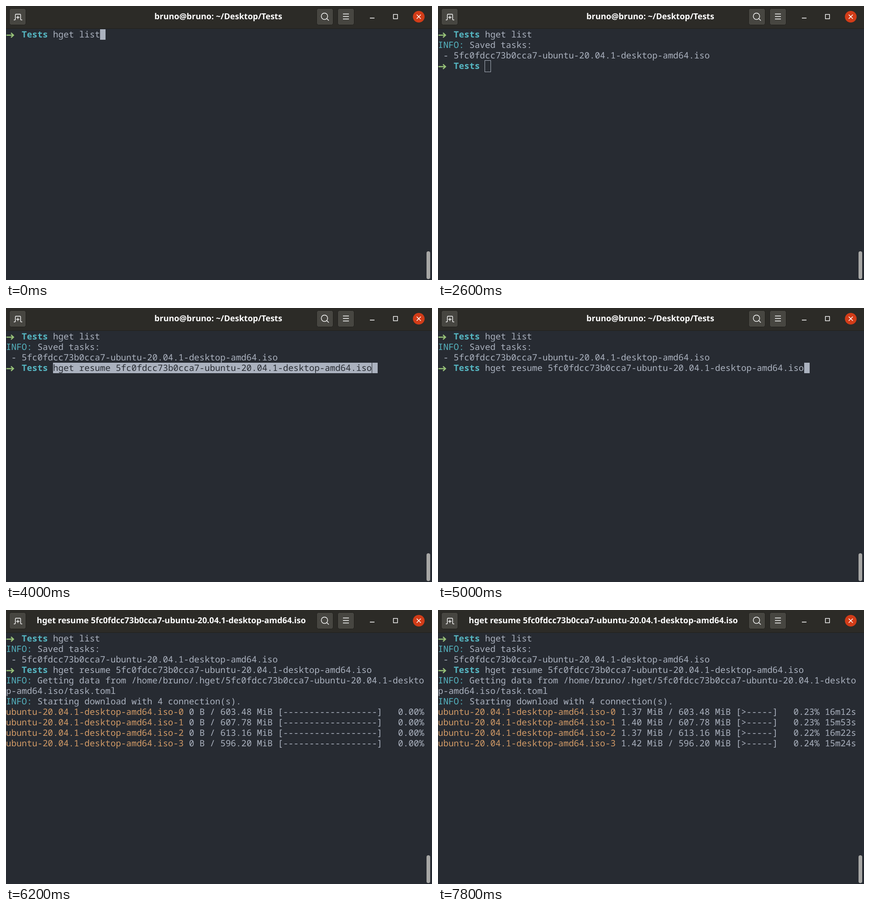
An HTML page for the animation above (8000 ms loop, 933 px wide and 601 px high).

```html
<!DOCTYPE html>
<html lang="en">
<head>
<meta charset="utf-8">
<title>Terminal</title>
<style>
  html, body { margin: 0; width: 100%; height: 100%; overflow: hidden; background: #272b32; }
  #stage { position: relative; width: 933px; height: 601px; overflow: hidden; background: #272b32; text-rendering: geometricPrecision; }
  #head { position: absolute; inset: 0 0 auto; height: 49px; background: #2c2b27; border-bottom: 1px solid #201f1c; }
  #title {
    position: absolute; top: 11px; line-height: 24px; white-space: pre;
    transform: translateX(-50%); color: #fff; font: bold 18px/24px "Noto Sans", sans-serif;
  }
  #icons { position: absolute; left: 0; top: 0; }
  #screen, #screen * { position: absolute; }
  #screen { inset: 0; font: 19.083px/23px "Noto Sans Mono", monospace; color: #abb2bf; }
  #screen span { white-space: pre; height: 23px; }
  #screen .cyan { color: #56b6c2; }
  #screen .dir { color: #56b6c2; font-weight: bold; }
  #screen .name { color: #d19a66; }
  #screen .picked { background: #abb2bf; color: #272b32; }
  .arrow { fill: none; stroke: #98c379; stroke-width: 2.4; }
  .block { width: 12px; height: 23px; background: #abb2bf; }
  .hollow { box-sizing: border-box; width: 14px; height: 26px; margin: -1px; border: 1px solid #abb2bf; }
  #menu {
    position: absolute; left: 235px; top: 152px; width: 199px; height: 269px; border-radius: 6px;
    background: #3d3d38; box-shadow: 0 0 0 1px #262624, 0 2px 4px #0006;
    color: #fff; font: 17.8px/32px "Noto Sans", sans-serif;
  }
  #menu div { position: absolute; left: 0; right: 0; height: 32px; padding-left: 38px; white-space: pre; }
  #menu .off { color: #91918d; }
  #menu .line { border-top: 1px solid #33332f; }
  #menu .hot { background: #585552; }
  #bar { position: absolute; left: 921px; top: 538px; width: 8px; height: 61px; border-radius: 4px; background: #a7a7a5; }
</style>
</head>
<body>
<div id="stage">
  <div id="head"></div>
  <svg id="icons" width="933" height="50" fill="none" stroke="#fff" stroke-width="1.4">
    <g fill="#474641" stroke="#201f1c" stroke-width="1">
      <rect x="7.5" y="5.5" width="36" height="36" rx="4"/>
      <rect x="680.5" y="5.5" width="36" height="36" rx="4"/>
      <rect x="726.5" y="5.5" width="36" height="36" rx="4"/>
    </g>
    <path d="M17 30.5h2q1.5 0 1.5-1.5V19.500q0-1.500 1.500-1.500h8.500q1.500 0 1.500 1.500V29q0 1.500 1.500 1.500h2M22.500 25h7M26 21.500v7"/>
    <circle cx="697.500" cy="22.500" r="7"/>
    <path d="M702.500 27.500l4.500 4.500M738 17.500h13M738 23h13M738 28.500h13"/>
    <path d="M797 26.500h10" stroke-width="1.600"/>
    <rect x="848.500" y="18.500" width="9" height="9.500"/>
    <circle cx="904" cy="23.500" r="12.800" fill="#d23c18" stroke="none"/>
    <path d="M899.500 19l9 9M908.500 19l-9 9" stroke-width="1.600"/>
  </svg>
  <div id="title"></div>
  <div id="screen"></div>
  <div id="menu"></div>
  <div id="bar"></div>
</div>
<script>
const LOOP = 8000, COLS = 80, CELL = 11.45, ROW = 23, TOP = 51;
const IMAGE = "ubuntu-20.04.1-desktop-amd64.iso";
const TASK = "5fc0fdcc73b0cca7-" + IMAGE;
const RESUME = "hget resume " + TASK;
const END = 9 + RESUME.length;
const $ = id => document.getElementById(id);

// Time, cursor column, row and style
const cursorSteps = [
  [0, 18, 0, "block"], [100], [700, 18, 0, "block"], [800, 0, 3, "block"],
  [1000, 9, 3, "block"], [1400], [2300, 9, 3, "block"], [2600, 9, 3, "hollow"],
  [3400, 9, 3, "block"], [4000, END, 3, "block"], [4400], [4600, END, 3, "block"],
  [5500, 0, 4, "block"], [5600, 0, 7, "block"], [5800, 0, 11, "block"],
  [6200], [6800, 0, 11, "block"], [7500]
];

// Time and share of the last downloaded amount
const loadSteps = [[5800, 0], [6600, .22], [7000, .26], [7200, .45], [7400, .68], [7600, .85], [7800, 1]];

// Total MiB, last amount in MiB, last remaining seconds
const parts = [[603.48, 1.37, 972], [607.78, 1.40, 953], [613.16, 1.37, 982], [596.20, 1.42, 924]];

const menuItems = [
  ["Copy", 6, "off"], ["Copy as HTML", 38, "off"], ["Paste", 70, ""],
  ["Read-Only", 102, "line"], ["Preferences", 135, ""], ["New Window", 167, "line"],
  ["New Tab", 200, ""], ["Show Menubar", 232, "line"]
];
$("menu").innerHTML = menuItems.map(([text, y, kind]) =>
  `<div class="${kind}" style="top:${y}px">${text}</div>`).join("");
const paste = $("menu").children[2];
paste.style.height = "31px";

const current = (steps, t) => steps.filter(s => s[0] <= t).pop();
const at = (col, row) => `style="left:${col * CELL}px;top:${TOP + row * ROW}px"`;
const put = (col, row, text, kind = "") =>
  `<span class="${kind}" ${at(col, row)}>${text.replace(/>/g, "&gt;")}</span>`;
const info = (row, text) => put(0, row, "INFO:", "cyan") + put(6, row, text);
const prompt = row =>
  `<svg class="arrow" width="20" height="23" ${at(0, row)}><path d="M1 13H16M11 8l5.500 5-5.500 5"/></svg>` +
  put(3, row, "Tests", "dir");

function progress([total, last, left], share, t) {
  const done = last * share;
  const amount = !done ? "0 B" : done < 1 ? (done * 1024).toFixed(2) + " KiB" : done.toFixed(2) + " MiB";
  const sizes = `${amount} / ${total.toFixed(2)} MiB `;
  let tail = "   " + (done / total * 100).toFixed(2) + "%";
  if (done) {
    const secs = Math.round(left / share * (t - 5600) / 2200);
    tail += ` ${Math.floor(secs / 60)}m${String(secs % 60).padStart(2, "0")}s`;
  }
  const room = COLS - 35 - sizes.length - tail.length - 2;
  return sizes + "[" + (done ? ">" : "-").padEnd(room, "-") + "]" + tail;
}

function screen(t) {
  let out = prompt(0) + put(9, 0, "hget list");
  if (t >= 800) out += info(1, "Saved tasks:") + put(0, 2, " - " + TASK);
  if (t >= 1000) out += prompt(3);
  if (t >= 4000) out += put(9, 3, RESUME, t < 5000 ? "picked" : "");
  if (t >= 5600) {
    const text = `Getting data from /home/bruno/.hget/${TASK}/task.toml`;
    out += info(4, text.slice(0, COLS - 6)) + put(0, 5, text.slice(COLS - 6));
    out += info(6, "Starting download with 4 connection(s).");
  }
  const load = current(loadSteps, t);
  if (load) parts.forEach((part, i) => {
    out += put(0, 7 + i, `${IMAGE}-${i}`, "name") + put(35, 7 + i, progress(part, load[1], load[0]));
  });
  const [, col, row, kind] = current(cursorSteps, t);
  if (kind) out += `<div class="${kind}" ${at(col, row)}></div>`;
  return out;
}

let shown = "";
function draw(now) {
  const t = now % LOOP;
  const html = screen(t);
  if (html !== shown) $("screen").innerHTML = shown = html;
  const busy = t >= 5500;
  const title = busy ? RESUME : "bruno@bruno: ~/Desktop/Tests";
  if ($("title").textContent !== title) $("title").textContent = title;
  $("title").style.left = busy ? "362px" : "465px";
  $("menu").style.display = t >= 2700 && t < 3400 ? "block" : "none";
  paste.className = t >= 3200 ? "hot" : "";
}

const start = performance.now();
function tick() {
  draw(performance.now() - start);
  requestAnimationFrame(tick);
}
tick();
</script>
</body>
</html>
```
